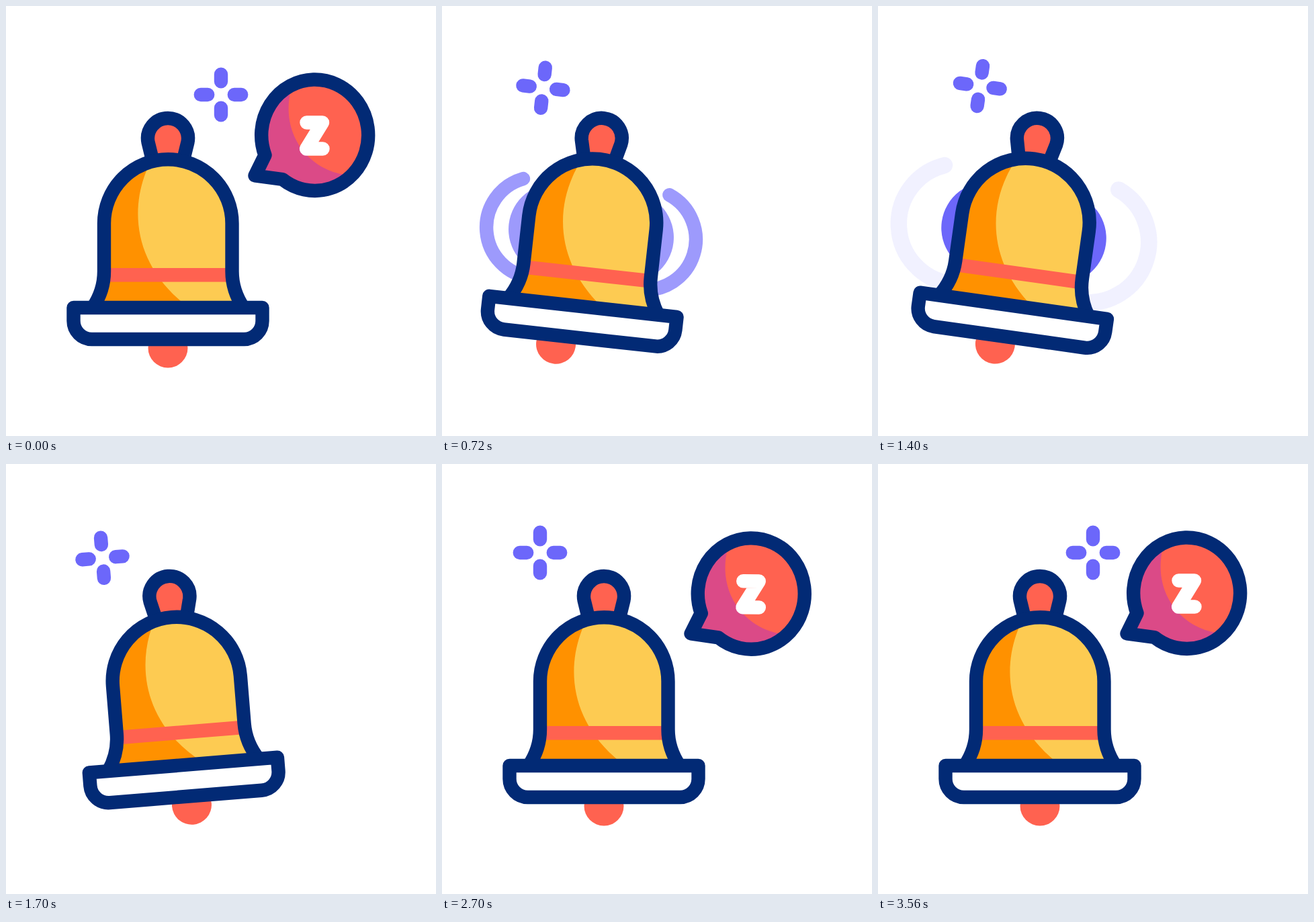
Write an HTML page that moves like this. It is 640 px wide and 640 px high and loops after 3600 ms.

```html
<!DOCTYPE html>
<html lang="en">
<head>
<meta charset="utf-8">
<title>Bell</title>
<style>
  html, body { margin: 0; width: 100%; height: 100%; overflow: hidden; background: #fff; }
  svg { display: block; width: 100vw; height: 100vh; }
  .ink { stroke: #022a75; stroke-width: 20.4; stroke-linejoin: round; }
  .line { fill: none; stroke: #6c67fa; stroke-width: 20.4; stroke-linecap: round; }
</style>
</head>
<body>
<svg viewBox="0 0 640 640">
  <defs>
    <path id="body" d="M129 449C140.5 432 146 415 146 395V323.5A95.25 95.25 0 0 1 336.5 323.5V395C336.5 415 342 432 353.5 449"/>
    <path id="balloon" d="M385.5 222A79.5 82.7 0 1 1 411.5 258L370.5 252.5Z"/>
    <path id="star" class="line" d="M0-30.2V-19.8M0 30.2V19.8M-30.2 0H-19.8M30.2 0H19.8"/>
    <clipPath id="inBody"><use href="#body"/></clipPath>
    <clipPath id="inBalloon"><use href="#balloon"/></clipPath>
  </defs>

  <g class="swing">
    <use id="starL" href="#star" x="146" y="132"/>
    <use id="starR" href="#star" x="320" y="132"/>
    <g id="disc" fill="#6c67fa">
      <rect x="117.7" y="271.5" width="246.6" height="136" rx="68"/>
    </g>
    <path id="arcs" class="line" d="M131.9 270A75 75 0 0 0 160 414.5M350.1 270A75 75 0 0 1 322 414.5"/>
  </g>

  <g id="bubble">
    <use href="#balloon" fill="#ff6250"/>
    <path clip-path="url(#inBalloon)" fill="#db4a87" d="M424 125C408 190 450 246 510 252V290H340V110Z"/>
    <use href="#balloon" class="ink" fill="none"/>
    <path d="M447.5 173.5H471L447 212.5H471.5" fill="none" stroke="#fff" stroke-width="20.4" stroke-linecap="round" stroke-linejoin="round"/>
  </g>

  <g class="swing">
    <circle id="clapper" cx="241" cy="509" r="29.5" fill="#ff6250"/>
    <path class="ink" fill="#ff6250" d="M217 225L211.6 203A30 30 0 1 1 270.4 203L265 225"/>
    <g clip-path="url(#inBody)">
      <rect x="120" y="220" width="240" height="232" fill="#fdcb52"/>
      <path fill="#ff9100" d="M214 234C182 300 190 385 268.5 446V460H120V220Z"/>
      <rect x="120" y="390" width="240" height="20.6" fill="#ff6250"/>
    </g>
    <use href="#body" class="ink" fill="none"/>
    <path class="ink" fill="#fff" d="M100.5 449H381.5V468.8A27.2 27.2 0 0 1 354.3 496H127.7A27.2 27.2 0 0 1 100.5 468.8Z"/>
  </g>
</svg>
<script>
  const LOOP = 3600;
  const get = id => document.getElementById(id);
  const swings = document.querySelectorAll('.swing');
  const [starL, starR, disc, arcs, bubble, clapper] =
    ['starL', 'starR', 'disc', 'arcs', 'bubble', 'clapper'].map(get);

  const clamp = x => Math.min(1, Math.max(0, x));
  const part = (t, a, b) => clamp((t - a) / (b - a));
  const sine = x => (1 - Math.cos(Math.PI * x)) / 2;

  // Value at t from [time, value] steps, eased in and out
  function track(steps, t) {
    let i = 0;
    while (i < steps.length - 2 && t > steps[i + 1][0]) i++;
    const [a, u] = steps[i], [b, v] = steps[i + 1];
    return u + (v - u) * sine(part(t, a, b));
  }

  // Rest, six alternating peaks, rest
  const ring = (start, first, gap, end, size) => [
    [start, 0],
    ...Array.from({ length: 6 }, (_, i) => [first + i * gap, i % 2 ? -size : size]),
    [end, 0]
  ];
  const bellTurn = ring(565, 791, 154.5, 1867, 8.1);
  const clapperShift = ring(560, 732, 155.2, 1790, -34.3);
  const bubbleTurn = [[2250, 0], [2515, 16.5], [2895, -16.5], [3275, 16.5], [3560, 0]];
  const discFade = [[600, 0], [800, 1], [1480, 1], [1640, 0]];
  const arcFade = [[600, 0], [800, 1], [830, 1], [950, 0]];

  const show = (el, on) => el.setAttribute('visibility', on ? 'visible' : 'hidden');

  function drawStars(t) {
    const step = Math.floor((t - 480) / 450);
    const left = t >= 480 && t < 2730 && step % 2 === 0;
    show(starL, left);
    show(starR, !left && !(t >= 3180 && t < 3480));
  }

  function drawWaves(t) {
    disc.setAttribute('opacity', track(discFade, t));
    const w = t < 1115 ? t : t - 475;
    const size = 0.8 + 0.4 * sine(part(w, 610, 830));
    show(arcs, w > 610 && w < 950);
    arcs.setAttribute('opacity', track(arcFade, w));
    arcs.setAttribute('transform', `translate(241 339.5) scale(${size}) translate(-241 -339.5)`);
  }

  function drawBubble(t) {
    const leaving = t < 1000;
    const rest = leaving ? part(t, 0, 440) : 1 - part(t, 1960, 2360);
    const away = rest * rest;
    const x = 370.5 - 133 * away;
    const y = 252.5 + (leaving ? 167 : 60) * away;
    const turn = away * (leaving ? 100 : -80) + (leaving ? 0 : track(bubbleTurn, t));
    const size = 1 - away ** 2.4;
    show(bubble, size > 0.001);
    bubble.setAttribute('transform',
      `translate(${x} ${y}) rotate(${turn}) scale(${size}) translate(-370.5 -252.5)`);
  }

  function draw(t) {
    const turn = `rotate(${track(bellTurn, t)} 241 167)`;
    swings.forEach(el => el.setAttribute('transform', turn));
    clapper.setAttribute('transform', `translate(${track(clapperShift, t)} 0)`);
    drawStars(t);
    drawWaves(t);
    drawBubble(t);
  }

  const begin = performance.now();
  function tick() {
    draw((performance.now() - begin) % LOOP);
    requestAnimationFrame(tick);
  }
  draw(0);
  requestAnimationFrame(tick);
</script>
</body>
</html>
```
